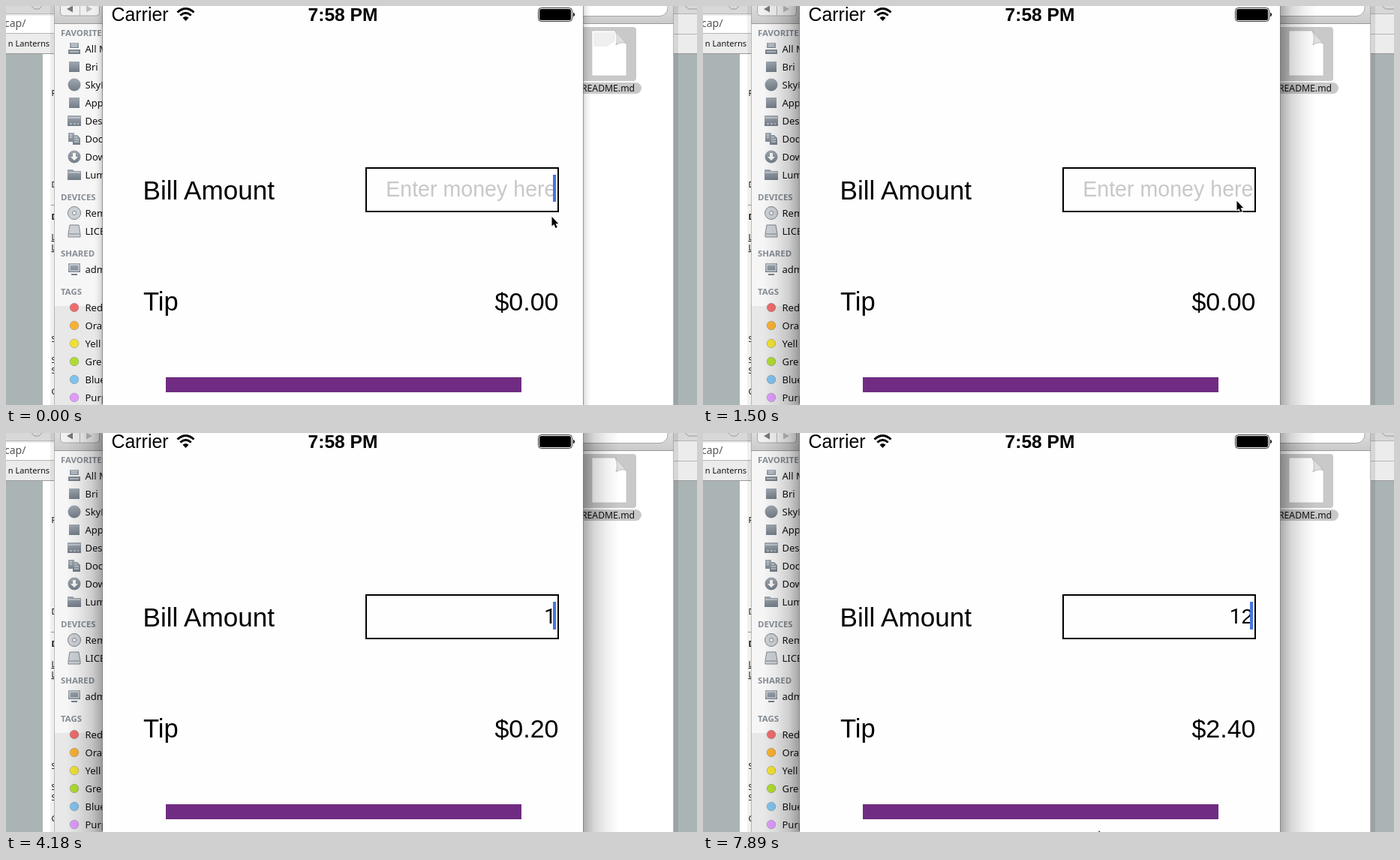
Write an HTML page that moves like this. It is 921 px wide and 532 px high and loops after 8 s.

```html
<!DOCTYPE html>
<html lang="en">
<head>
<meta charset="utf-8">
<title>Tip calculator</title>
<style>
  html, body { margin: 0; width: 100%; height: 100%; overflow: hidden; background: #fff; }
  svg { display: block; width: 921px; height: 532px; }
  text { white-space: pre; }
  .ui { font: 500 13px "Noto Sans", "Open Sans", sans-serif; fill: #111; }
  .head { font: bold 11.4px "Noto Sans", "Open Sans", sans-serif; fill: #858c94; }
  .app { font-family: "Liberation Sans", Arial, sans-serif; fill: #000; }
  .end { text-anchor: end; }
</style>
</head>
<body>
<svg viewBox="0 0 921 532" xmlns="http://www.w3.org/2000/svg">
  <defs>
    <linearGradient id="bar" x2="0" y2="1">
      <stop stop-color="#dcdcdc"/><stop offset="1" stop-color="#cacaca"/>
    </linearGradient>
    <linearGradient id="metal" x2="0" y2="1">
      <stop stop-color="#a0a8b1"/><stop offset="1" stop-color="#727c87"/>
    </linearGradient>
    <linearGradient id="shade">
      <stop stop-opacity="0"/><stop offset=".35" stop-opacity=".06"/>
      <stop offset=".7" stop-opacity=".16"/><stop offset="1" stop-opacity=".34"/>
    </linearGradient>
    <clipPath id="sideClip"><path d="M64 0H129V532H64z"/></clipPath>
    <clipPath id="pageClip"><path d="M0 0H64V532H0z"/></clipPath>
  </defs>

  <!-- browser at the back -->
  <rect width="921" height="532" fill="#aab4b5"/>
  <rect width="921" height="64" fill="#ececec"/>
  <rect width="921" height="10" fill="#d8d8d8"/>
  <path d="M0 10.5H64M890 10.5H921" stroke="#b5b5b5"/>
  <path d="M34 0l4 4h6l4-4M905 0l5 4h11" fill="none" stroke="#999"/>
  <path d="M0 13H64V36H0z" fill="#fff"/>
  <path d="M0 36.5H64M890 37.5H921" stroke="#b5b5b5"/>
  <path d="M0 63.5H64M890 63.5H921" stroke="#999"/>
  <rect x="49" y="64" width="15" height="468" fill="#fff"/>
  <g id="page" clip-path="url(#pageClip)">
    <text x="-2" y="28" style="font:14px 'Noto Sans',sans-serif" fill="#555">cap/</text>
    <text class="ui" x="58" y="54" text-anchor="end" style="font-size:11px">n Lanterns</text>
    <path d="M60 265.5H64" stroke="#999"/>
  </g>
  <path d="M59 0H64V532H59z" fill="#000" opacity=".06"/>
  <path d="M890 0H896V532H890z" fill="#000" opacity=".09"/>

  <!-- file window -->
  <rect x="64" width="826" height="532" fill="#fff"/>
  <rect x="64" width="826" height="24" fill="url(#bar)"/>
  <path d="M64 23.5H890" stroke="#9a9a9a"/>
  <path d="M72.500-4H124.500V9q0 4-4 4H76.500q-4 0-4-4z" fill="#f0f0f0" stroke="#a5a5a5"/>
  <path d="M98.500 0V13" stroke="#b5b5b5"/>
  <path d="M81 4l8-4.500v9z" fill="#777"/><path d="M115 4l-8-4.500v9z" fill="#bbb"/>
  <rect x="700" y="-14" width="182" height="27.500" rx="11" fill="#fff" stroke="#a5a5a5"/>
  <path d="M64 24H129V400H64z" fill="#f6f6f6"/>
  <path d="M64 400H129V532H64z" fill="#e8e8e8"/>
  <path d="M64.500 0V532M889.500 0V532" stroke="#999" opacity=".65"/>
  <g id="side" clip-path="url(#sideClip)"></g>

  <rect x="760" y="28" width="80" height="72" rx="4" fill="#c9c9c9"/>
  <path d="M781 33H812L827 50V93H781z" fill="#fff" stroke="#bbb" stroke-width=".6"/>
  <path id="docTint" d="M783 35H812V47L801 54H783z" fill="#efefef"/>
  <path d="M812 33L827 50Q820 47 813 52Q816 42 812 33z" fill="#dedede" stroke="#a5a5a5" stroke-width=".6"/>
  <rect x="755" y="102" width="92" height="15" rx="7.500" fill="#c8c8c8"/>
  <text class="ui" x="767" y="114" style="font-size:12.200px">README.md</text>

  <!-- phone window with its shadow -->
  <g id="slim" opacity=".55">
    <rect x="118" width="11" height="532" fill="url(#shade)"/>
    <rect x="-780" width="11" height="532" fill="url(#shade)" transform="scale(-1 1)"/>
  </g>
  <g id="wide">
    <rect x="80" width="49" height="532" fill="url(#shade)"/>
    <rect x="-818" width="49" height="532" fill="url(#shade)" transform="scale(-1 1)"/>
  </g>
  <path d="M128.500 0V532M769.500 0V532" stroke="#777" opacity=".65"/>
  <rect x="129" width="640" height="532" fill="#fefefe"/>

  <g class="app">
    <text x="140.500" y="20" font-size="24.900">Carrier</text>
    <text x="449" y="20" font-size="24.600" font-weight="bold" text-anchor="middle">7:58 PM</text>
    <text x="182.500" y="258" font-size="35.100">Bill Amount</text>
    <text x="183" y="406" font-size="34.500">Tip</text>
    <text id="tip" class="end" x="736.500" y="406" font-size="34"></text>
  </g>
  <g fill="none" stroke="#000" stroke-width="3">
    <path d="M228.500 8.500Q239.500-1.500 250.500 8.500M232.300 12.500Q239.500 6 246.700 12.500"/>
    <path d="M235.500 15.700Q239.500 12.300 243.500 15.700L239.500 20z" fill="#000" stroke="none"/>
  </g>
  <rect x="709.500" y="2.500" width="45" height="18" rx="4" fill="none" stroke="#000" stroke-width=".8"/>
  <rect x="711" y="4" width="42" height="15" rx="2.500"/>
  <path d="M756 8.500q2 1 2 3t-2 3z"/>
  <rect x="480" y="216" width="256" height="58" fill="#fefefe" stroke="#000" stroke-width="2"/>
  <text id="hint" class="app end" x="733.500" y="254" font-size="28.600" style="fill:#c8c8cb">Enter money here</text>
  <text id="bill" class="app end" x="733" y="254" font-size="28"><tspan style="font-family:Roboto,sans-serif">1</tspan><tspan id="two">2</tspan></text>
  <rect id="caret" x="729" y="225" width="4" height="36" fill="#4676df"/>
  <rect x="213" y="495" width="474" height="20" fill="#702c82"/>
  <path id="mouse" d="M0 0V12.500L2.800 10 5 15 7.200 14 5.100 9.200H8.800z" fill="#000" stroke="#fff" stroke-width="1.600" paint-order="stroke"/>
</svg>

<script>
const LOOP = 8000;
const $ = id => document.getElementById(id);

function add(parent, tag, attrs, text) {
  const el = document.createElementNS("http://www.w3.org/2000/svg", tag);
  for (const key in attrs) el.setAttribute(key, attrs[key]);
  if (text) el.textContent = text;
  parent.append(el);
}

// Icons are drawn around their own centre.
const icons = {
  files: "M-6-8H6V-1H-6zM-8 1H8V7H-8z",
  square: "M-7-7H7V7H-7z",
  circle: "M-8.500 0a8.500 8.500 0 1 0 17 0a8.500 8.500 0 1 0-17 0",
  desk: "M-9-7H9V7H-9z",
  docs: "M-8-8H0V4H-8zM-2-5H4L8-1V8H-2z",
  folder: "M-9-7H-2L0-5H9V7H-9z",
  drive: "M-6-8H6L8 4V8H-8V4z",
  screen: "M-8-8H8V4H-8zM-4 6H4V8H-4z"
};
const marks = {
  files: "M-4-6H4M-4-3.500H4M-6 4H6",
  desk: "M-8-4H8M-6 4H-3M-1 4H2M4 4H6",
  docs: "M-6-5H-3M-6-2H-3M0-2H4M0 1H6M0 4H6",
  folder: "M-8-3H8",
  drive: "M-7 4H7",
  screen: "M-6-6H6V2H-6z"
};

const side = $("side");
const heads = [["FAVORITES", 40], ["DEVICES", 259], ["SHARED", 334], ["TAGS", 385]];
heads.forEach(([name, y]) => add(side, "text", { x: 73, y, class: "head" }, name));

const rows = [
  ["All M", 57, "files"], ["Bri", 81, "square"], ["SkyP", 105, "circle"],
  ["App", 129, "square"], ["Des", 153, "desk"], ["Doc", 177, "docs"],
  ["Dow", 201, "down"], ["Lum", 225, "folder"], ["Rem", 276, "disc"],
  ["LICE", 300, "drive"], ["adm", 351, "screen"]
];
for (const [name, y, icon] of rows) {
  const transform = `translate(91 ${y})`;
  const light = icon === "drive" || icon === "disc";
  add(side, "path", {
    d: icons[icon] || icons.circle, transform,
    fill: light ? "#cdd1d5" : "url(#metal)", stroke: light ? "#7d858e" : "none"
  });
  if (marks[icon]) add(side, "path", { d: marks[icon], transform, fill: "none", stroke: light ? "#7d858e" : "#e2e6ea" });
  if (icon === "down") add(side, "path", { d: "M-2-5H2V0H5L0 5-5 0H-2z", transform, fill: "#f6f6f6" });
  if (icon === "disc") add(side, "circle", { r: 2.5, transform, fill: "#f6f6f6", stroke: "#7d858e" });
  add(side, "text", { x: 105.5, y: y + 4.5, class: "ui" }, name);
}

const tags = [["Red", "#ef6c6c"], ["Ora", "#f8b132"], ["Yell", "#f1e133"],
  ["Gre", "#afdc31"], ["Blue", "#80c2f0"], ["Purp", "#df9bfd"]];
tags.forEach(([name, fill], i) => {
  const y = 402 + 24 * i;
  add(side, "circle", { cx: 91, cy: y, r: 5.8, fill, stroke: "#555", "stroke-opacity": .3 });
  add(side, "text", { x: 105.5, y: y + 4.5, class: "ui" }, name);
});

const scraps = [["F", 120], ["D", 242], ["D", 285], ["L", 312], ["L", 326],
  ["S", 448], ["S", 476], ["S", 490], ["C", 518]];
for (const [letter, y] of scraps) {
  add($("page"), "text", {
    x: 60.5, y, class: "ui",
    style: `font-size:11px;${y === 285 ? "font-weight:bold;" : ""}${letter === "L" ? "text-decoration:underline" : ""}`
  }, letter);
}

// Each table holds [start ms, value...]; a value stays until the next start.
const HALF = .4;
const blink = [
  [0, 1], [300, HALF], [450, 0], [750, HALF], [900, 1], [1200, HALF], [1350, 0],
  [1650, 1], [2230, HALF], [2380, 0], [2680, 1], [3130, HALF], [3280, 0],
  [3580, HALF], [3730, 1], [5370, HALF], [5510, 0], [5960, 1], [6410, HALF],
  [6550, 0], [6850, HALF], [7000, 1], [7440, HALF], [7590, 0], [7890, 1]
];
const path = [
  [0, 727.5, 281], [1050, 718, 269], [1200, 711.5, 260], [1800, 707, 316],
  [1940, 699.5, 421], [2230, -50, -50], [7890, 527.5, 530]
];
const entry = [[0, "", "$0.00"], [4180, "1", "$0.20"], [4920, "12", "$2.40"]];
const at = (table, t) => table.findLast(row => row[0] <= t);
const show = (id, on) => { $(id).style.display = on ? "" : "none"; };

function draw(t) {
  const [, x, y] = at(path, t);
  const [, bill, tip] = at(entry, t);
  const active = t >= 1500;
  $("caret").setAttribute("opacity", at(blink, t)[1]);
  $("caret").setAttribute("height", bill ? 37 : 36);
  $("mouse").setAttribute("transform", `translate(${x} ${y})`);
  $("tip").textContent = tip;
  show("hint", !bill);
  show("bill", bill);
  show("two", bill === "12");
  show("wide", active);
  show("slim", !active);
  show("docTint", !active);
}

const start = performance.now();
function tick() {
  draw((performance.now() - start) % LOOP);
  requestAnimationFrame(tick);
}
tick();
</script>
</body>
</html>
```
